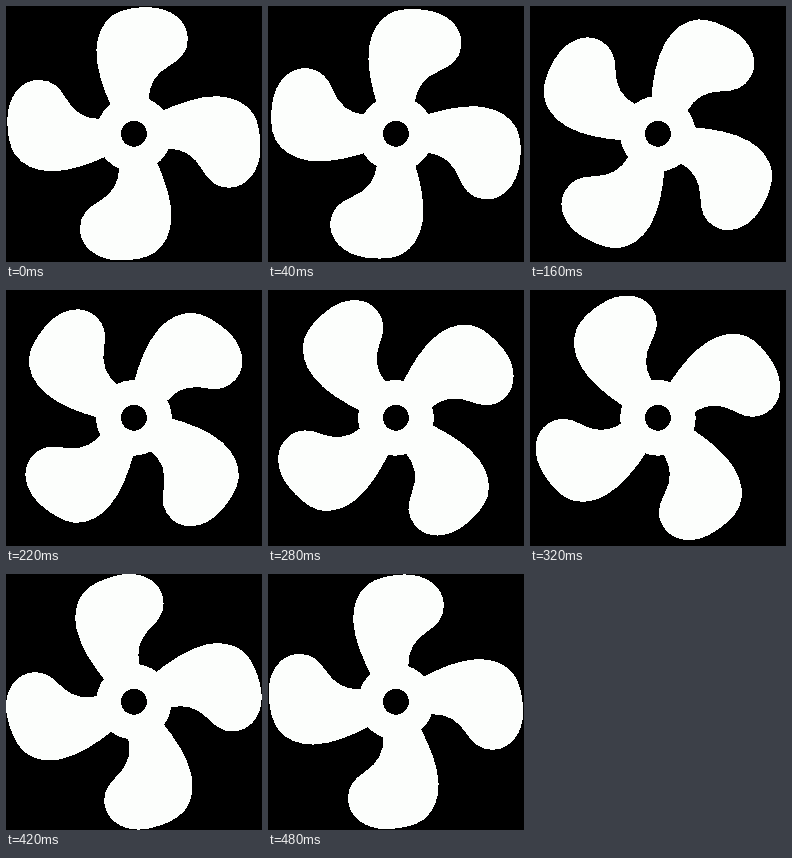
These frames come from a looping animation (256x256 px, 500 ms). An HTML page:

```html
<!DOCTYPE html>
<html lang="en">
<head>
<meta charset="utf-8">
<title>Fan</title>
<style>
html, body { margin: 0; width: 100%; height: 100%; overflow: hidden; background: #000; }
svg { display: block; width: 100vw; height: 100vh; }
</style>
</head>
<body>
<svg viewBox="0 0 256 256" shape-rendering="crispEdges">
  <defs>
    <path id="blade" d="M-22 -26 C-31 -46 -38 -66 -37.5 -84 C-37 -99.5 -31 -111.5 -21 -118.8
      C-12 -125 2 -126.6 14 -126.6 C37 -126.6 54 -113 54 -95 C54 -81.5 46 -74 36 -68.3
      C21 -59.7 15 -49 14.8 -34 L0 -20 Z"/>
  </defs>
  <g transform="translate(127.9 127.8)">
    <g id="fan" fill="#fcfefc">
      <use href="#blade"/>
      <use href="#blade" transform="rotate(90)"/>
      <use href="#blade" transform="rotate(180)"/>
      <use href="#blade" transform="rotate(270)"/>
      <circle r="37.8"/>
    </g>
    <circle r="12.9"/>
  </g>
</svg>
<script>
const LOOP = 500, STEP = 20, TURN = 90;
const fan = document.getElementById('fan');
let start = null;

function draw(ms) {
  const t = Math.floor((ms % LOOP) / STEP) * STEP;
  fan.setAttribute('transform', `rotate(${TURN * t / LOOP})`);
}

function tick(now) {
  if (start === null) start = now;
  draw(now - start);
  requestAnimationFrame(tick);
}

draw(0);
requestAnimationFrame(tick);
</script>
</body>
</html>
```
